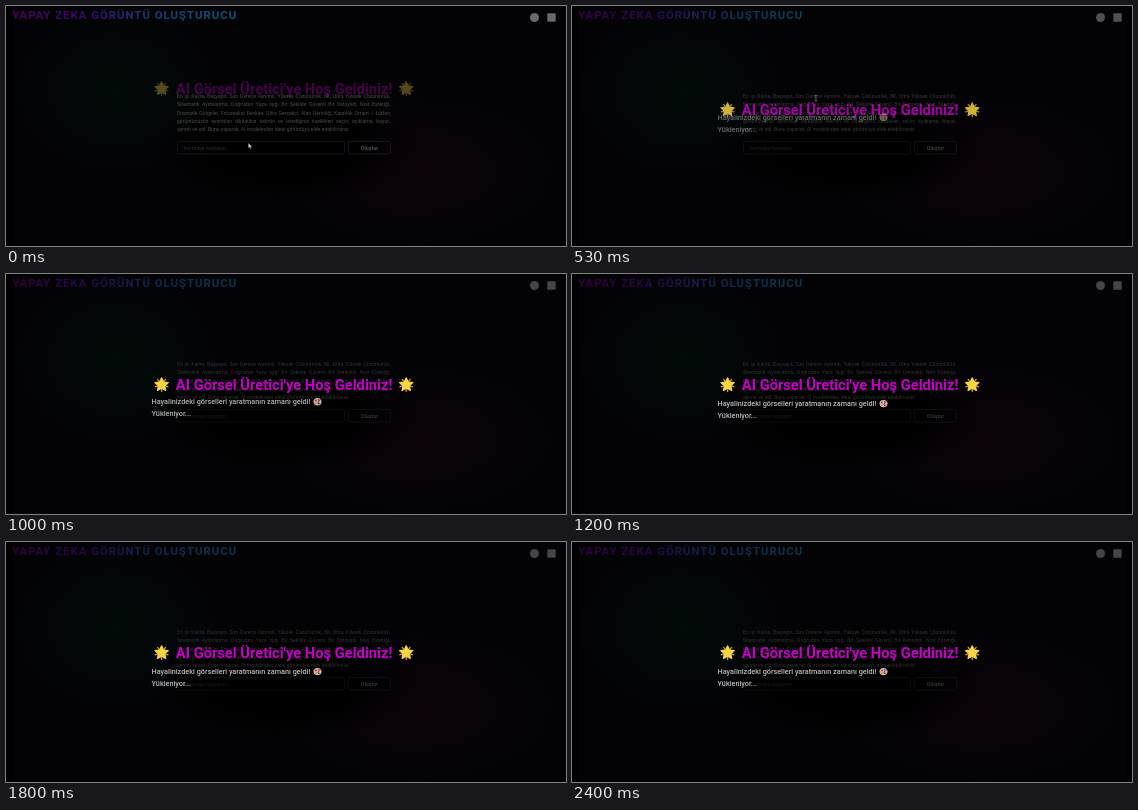
Recreate the animation shown at these times as an HTML page. Size 560 by 240 pixels, loop 2470 ms.

```html
<!DOCTYPE html>
<html lang="tr">
<head>
<meta charset="utf-8">
<style>
  html, body { margin: 0; width: 100%; height: 100%; overflow: hidden; background: #000; }
  svg { display: block; width: 560px; height: 240px; font-family: Roboto, sans-serif; }
  #info { font: 5.1px/8.25px Roboto, sans-serif; color: #4c4c46; width: 213px; }
  #info div { white-space: nowrap; text-align: justify; text-align-last: justify; }
  #info div:last-child { text-align-last: left; }
</style>
</head>
<body>
<svg viewBox="0 0 560 240">
  <defs>
    <linearGradient id="brand" gradientUnits="userSpaceOnUse" x1="6" x2="231">
      <stop offset="0" stop-color="#4c0058"/>
      <stop offset=".35" stop-color="#340c6c"/>
      <stop offset=".6" stop-color="#1a3878"/>
      <stop offset="1" stop-color="#0c5674"/>
    </linearGradient>
    <radialGradient id="teal">
      <stop offset="0" stop-color="#020b08"/><stop offset="1" stop-color="#020b08" stop-opacity="0"/>
    </radialGradient>
    <radialGradient id="plum">
      <stop offset="0" stop-color="#0c030a"/><stop offset="1" stop-color="#0c030a" stop-opacity="0"/>
    </radialGradient>
    <radialGradient id="shade">
      <stop offset=".5" stop-color="#000"/><stop offset="1" stop-color="#000" stop-opacity="0"/>
    </radialGradient>
    <g id="star">
      <path id="rays" stroke="#d99a28" stroke-width="1.3" stroke-linecap="round"/>
      <path id="body" fill="#f6d648" stroke="#f6d648" stroke-width="1.2" stroke-linejoin="round"/>
    </g>
  </defs>

  <rect width="560" height="240" fill="#000"/>
  <rect x="7" width="548" height="240" fill="#030306"/>
  <ellipse cx="110" cy="85" rx="103" ry="85" fill="url(#teal)"/>
  <ellipse cx="410" cy="165" rx="140" ry="75" fill="url(#plum)"/>
  <ellipse cx="278" cy="142" rx="140" ry="58" fill="url(#shade)"/>

  <g id="page">
    <text x="6.3" y="13.1" font-size="11.3" font-weight="700" letter-spacing="1.04" fill="url(#brand)">YAPAY ZEKA GÖRÜNTÜ OLUŞTURUCU</text>
    <circle cx="528.5" cy="11.5" r="4.5" fill="#6a6a6a"/>
    <rect x="541.3" y="7.3" width="8.4" height="8.4" rx=".8" fill="#6a6a6a"/>
    <foreignObject x="171" y="86" width="220" height="46">
      <div id="info">
        <div>En iyi Kalite, Başyapıt, Son Derece Ayrıntılı, Yüksek Çözünürlük, 8K, Ultra Yüksek Çözünürlük,</div>
        <div>Sinematik Aydınlatma, Doğrudan Yaza Işığı Bir Şekilde Güvenli Bir Detaylıdı, Noir Estetiği,</div>
        <div>Dramatik Gölgeler, Fotorealist Renkler, Ultra Gerçekçi, Alan Derinliği, Karanlık Ortam – Lütfen</div>
        <div>görüntünüzün ayrıntıları dikkatlice belirtin ve istediğiniz özellikleri seçin; açıklama, boyut,</div>
        <div>ayrıntı ve stil. Bunu yaparak, AI modelinden ideal görüntüyü elde edebilirsiniz.</div>
      </div>
    </foreignObject>
    <g fill="none" stroke-width=".7">
      <rect x="171.4" y="135.4" width="167" height="12.6" rx="1.5" stroke="#1e1e2c"/>
      <rect x="342.4" y="135.4" width="42" height="12.6" rx="1.5" stroke="#222240"/>
    </g>
    <text x="177" y="143.6" font-size="5.4" fill="#2c2c28">Yazmaya başlayın...</text>
    <text x="363.4" y="143.8" font-size="5.3" font-weight="500" text-anchor="middle" fill="#5c5c52">Oluştur</text>
  </g>

  <g id="head">
    <use href="#star" x="155.6" y="110.8"/>
    <text x="169.8" y="116" font-size="14.7" font-weight="700" fill="#c600c8">AI Görsel Üretici'ye Hoş Geldiniz!</text>
    <use href="#star" x="400.2" y="110.8"/>
  </g>

  <g id="sub" font-size="7.25" font-weight="500" fill="#bcbcbc">
    <text x="145.6" y="132.1">Hayalinizdeki görselleri yaratmanın zamanı geldi!</text>
    <g transform="translate(311.5 129.6)">
      <ellipse rx="4" ry="3.7" fill="#d8b8b0"/>
      <circle cx="-1.6" cy="-1.2" r="1" fill="#c03a50"/>
      <circle cx="1.2" cy="-1.7" r=".9" fill="#4a70b8"/>
      <circle cx="-1.5" cy="1.5" r=".9" fill="#b89030"/>
      <path d="M0 1L3.6 -3" stroke="#a03848" stroke-width="1"/>
      <circle cx="1.3" cy="1.7" r=".8" fill="#181014"/>
    </g>
    <text x="145.6" y="144.2">Yükleniyor...</text>
  </g>

  <path id="arrow" d="M0 0V5.2L1.3 4.1L2.2 6L3.1 5.6L2.2 3.8H3.8Z" fill="#ddd" stroke="#111" stroke-width=".3"/>
  <path id="beam" d="M-1.3 -2.8H1.3M0 -2.8V2.8M-1.3 2.8H1.3" fill="none" stroke="#888" stroke-width=".7"/>
</svg>
<script>
const LOOP = 2470, STEP = 200 / 3, LAG = 270;
const $ = id => document.getElementById(id);

// Star shape: five points, with short rays between them
const polar = (r, deg) => {
  const a = deg * Math.PI / 180;
  return (r * Math.sin(a)).toFixed(2) + ' ' + (-r * Math.cos(a)).toFixed(2);
};
let body = '', rays = '';
for (let i = 0; i < 10; i++) body += (i ? 'L' : 'M') + polar(i % 2 ? 3.4 : 7, i * 36);
for (let i = 0; i < 5; i++) rays += 'M' + polar(3, i * 72 + 36) + 'L' + polar(6.7, i * 72 + 36);
$('body').setAttribute('d', body + 'Z');
$('rays').setAttribute('d', rays);

// Linear interpolation through [time, value] points
function track(points, t) {
  if (t <= points[0][0]) return points[0][1];
  for (let i = 1; i < points.length; i++) {
    const [t0, a] = points[i - 1], [t1, b] = points[i];
    if (t <= t1) return a + (b - a) * (t - t0) / (t1 - t0);
  }
  return points[points.length - 1][1];
}

const FADE = 42;
const fall = [[-270, -47], [-120, -36], [0, -28], [260, -18.5], [530, -7], [680, -2.8], [800, -.7], [930, 0]];
const mouseX = [[0, 242.3], [530, 243.5], [800, 279.5], [1000, 308]];
const mouseY = [[0, 137], [330, 118], [530, 93], [800, 27.5], [1000, -10]];
const dim = [[0, 1], [530, .76], [800, .67], [1000, .65]];

function drop(id, t) {
  const dy = track(fall, t);
  $(id).setAttribute('transform', `translate(0 ${dy})`);
  $(id).setAttribute('opacity', Math.max(0, 1 + dy / FADE));
}

function draw(now) {
  const t = Math.floor((now % LOOP + 4) / STEP) * STEP;
  drop('head', t);
  drop('sub', t - LAG);
  $('page').setAttribute('opacity', track(dim, t));

  const x = track(mouseX, t), y = track(mouseY, t);
  const overText = y > 86 && y < 128;
  $('arrow').setAttribute('transform', `translate(${x} ${y})`);
  $('beam').setAttribute('transform', `translate(${x} ${y})`);
  $('arrow').setAttribute('visibility', overText ? 'hidden' : 'visible');
  $('beam').setAttribute('visibility', overText ? 'visible' : 'hidden');
}

const start = performance.now();
function loop() {
  draw(performance.now() - start);
  requestAnimationFrame(loop);
}
draw(0);
requestAnimationFrame(loop);
</script>
</body>
</html>
```
